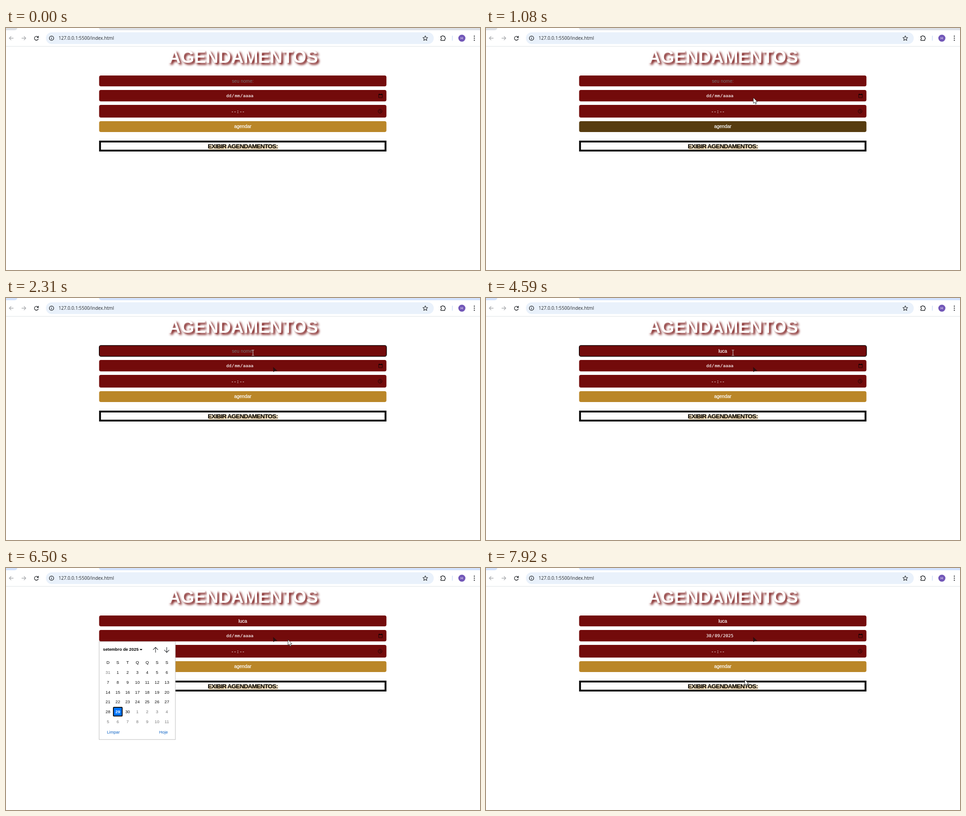
Recreate the animation shown at these times as an HTML page. Size 1046 px wide and 535 px high, loop 8 s.

```html
<!DOCTYPE html>
<html lang="pt-BR">
<head>
<meta charset="utf-8">
<title>Agendamentos</title>
<style>
  html, body { margin: 0; width: 100%; height: 100%; overflow: hidden; background: #fff; }
  svg { display: block; width: 1046px; height: 535px; font-family: "Liberation Sans", Arial, sans-serif; }
  .mid { text-anchor: middle; }
  .field { fill: #730b0b; }
  .input { font-size: 10.3px; fill: #fff; stroke: #fff; stroke-width: .25px; text-anchor: middle; }
  .hint { font-size: 10.3px; fill: #757575; text-anchor: middle; }
  .mono { font: 9.5px "DejaVu Sans Mono", monospace; fill: #fff; stroke: #fff; stroke-width: .15px; }
  .line { fill: none; stroke: #25282c; stroke-width: 1.3px; }
  .faded { stroke: #a9abae; }
  .title { font-size: 38.5px; font-weight: bold; fill: #fff; text-shadow: 4px 4px 5px #730b0b; }
  .list { font-size: 13.5px; font-weight: bold; letter-spacing: -.72px; text-shadow: 2px 2px 4px #bb8628; }
  .url { font: 10.1px "Open Sans", "Noto Sans", sans-serif; fill: #24282d; }
  .calendar { font-size: 9.3px; }
  .link { fill: #0b62c4; }
</style>
</head>
<body>
<svg viewBox="0 0 1046 535">
  <g id="browser">
    <path id="tabs" d="M0 0H25Q24 5 18 5H0ZM205 0Q206 5 212 5H1046V0Z"/>
    <path d="M0 40.5H1046" stroke="#dfe2e6"/>
    <rect x="88" y="9.5" width="856" height="26" rx="13" fill="#e9f1fb"/>
    <path class="line faded" d="M16.5 22.5H7.5M11.5 18.3L7.3 22.5L11.5 26.7M34.5 22.5H43.5M39.5 18.3L43.7 22.5L39.5 26.7"/>
    <path class="line" d="M70.6 20.2A4.3 4.3 0 1 0 71.3 23.6M71.5 17.6V21H68"/>
    <circle class="line" cx="100.5" cy="22.5" r="4.8" stroke-width="1.1"/>
    <path class="line" d="M100.5 21.9V25.2M100.5 19.5V20.8"/>
    <text class="url" x="116" y="26">127.0.0.1:5500/index.html</text>
    <path class="line" stroke-linejoin="round" style="stroke-width:1.1px"
      d="M925.3 17.2L926.9 20.8L930.7 21.2L927.8 23.7L928.7 27.5L925.3 25.5L921.9 27.5L922.8 23.7L919.9 21.2L923.7 20.8Z"/>
    <path class="line" stroke-linejoin="round"
      d="M959.5 18.5H962.3A1.6 1.6 0 0 1 965.5 18.5H968.3V21.3A1.6 1.6 0 0 1 968.3 24.5V27.5H959.5V24.7A1.7 1.7 0 0 0 959.5 21.3Z"/>
    <path d="M985 17V28" stroke="#c3d8f5" stroke-width="1.3"/>
    <circle cx="1006" cy="22.5" r="7.8" fill="#7257b8"/>
    <text class="mid" x="1006" y="25.4" font-size="8" fill="#fff">H</text>
    <path d="M1033.5 18V18M1033.5 22.5V22.5M1033.5 27V27" stroke="#25282c" stroke-width="2.4" stroke-linecap="round"/>
  </g>

  <text class="title mid" x="523" y="76.5">AGENDAMENTOS</text>
  <rect class="field" x="205.5" y="105" width="634" height="24" rx="4"/>
  <rect id="focus" x="205.8" y="105" width="633.8" height="24" rx="4" fill="none" stroke="#100303" stroke-width="1.6"/>
  <text id="hint" class="hint" x="522.5" y="120.7">seu nome:</text>
  <text id="name" class="input" x="522.5" y="120.7"></text>
  <rect id="caret" y="111" width="1" height="12" fill="#fff"/>

  <rect class="field" x="205.5" y="137" width="634" height="25.3" rx="4"/>
  <text id="day" class="mono" x="486" y="153.2"></text>
  <text class="mono" x="498" y="153.2">/</text>
  <text id="month" class="mono" x="504.7" y="153.2"></text>
  <text class="mono" x="516.7" y="153.2">/</text>
  <text id="year" class="mono" x="523" y="153.2"></text>
  <path d="M822.5 147.5H830.5V154H822.5Z" fill="none" stroke="#160303"/>
  <path d="M822 146.8H831M824 145.3V147M829 145.3V147" stroke="#160303" stroke-width="1.5"/>

  <rect class="field" x="205.5" y="170" width="634" height="28" rx="4"/>
  <text class="mono mid" x="502.5" y="187.5">--</text>
  <text class="mono mid" x="511.7" y="187.5">:</text>
  <text class="mono mid" x="521" y="187.5">--</text>
  <circle cx="825.5" cy="184" r="4.2" fill="none" stroke="#160303"/>
  <path d="M825.5 181.3V184.3L827.5 185.5" fill="none" stroke="#160303"/>

  <path id="smudge" d="M589.5 152.5L599 161L592.5 161.5L590 164Z" fill="#2d0c0e"/>
  <rect id="button" x="205.5" y="206" width="634" height="24" rx="4"/>
  <text class="input" x="522.5" y="221">agendar</text>
  <rect x="207.5" y="251" width="630" height="20" fill="#fff" stroke="#000" stroke-width="4"/>
  <text class="list mid" x="522.5" y="266.2">EXIBIR AGENDAMENTOS:</text>

  <g id="calendar" class="calendar">
    <rect x="205.5" y="162.8" width="168.3" height="216.4" fill="#fff" stroke="#bcbcbc"/>
    <text x="214" y="183.3" font-weight="bold">setembro de 2025</text>
    <path d="M295 179H301L298 182.3Z"/>
    <path class="line" style="stroke-width:1.1px" d="M330 187V175.5M324.6 180.8L330 175.3L335.4 180.8M354.7 175V186.5M349.3 181.2L354.7 186.7L360.1 181.2"/>
    <g id="cells"></g>
    <text class="link" x="222.7" y="366.4">Limpar</text>
    <text class="link" x="338" y="366.4">Hoje</text>
  </g>

  <path id="arrow" d="M0 0V12.6L2.9 9.9L4.8 14.3L6.8 13.5L5 9.2H8.8Z" fill="#fff" stroke="#222" stroke-width=".9" stroke-linejoin="round"/>
  <path id="beam" d="M-2.5 -6H-.7L0 -5.3L.7 -6H2.5M0 -5.3V5.3M-2.5 6H-.7L0 5.3L.7 6H2.5" fill="none" stroke="#d9e2e2"/>
</svg>
<script>
const LOOP = 8000, NAME = 'luca';
const $ = id => document.getElementById(id);
const show = (id, on) => $(id).setAttribute('visibility', on ? 'visible' : 'hidden');
const setText = (id, value) => { if ($(id).textContent !== value) $(id).textContent = value; };
const lerp = (a, b, u) => a + (b - a) * u;

function add(parent, tag, attrs, text) {
  const el = document.createElementNS('http://www.w3.org/2000/svg', tag);
  for (const key in attrs) el.setAttribute(key, attrs[key]);
  if (text !== undefined) el.textContent = text;
  parent.append(el);
  return el;
}

// Calendar grid
const PITCH = 21.65, GRID = { x: 214.2, y: 220.2 }, TODAY = 29;
const cells = [];
[...'DSTQQSS'].forEach((letter, i) =>
  add($('cells'), 'text', { class: 'mid', x: 225 + i * PITCH, y: 211.8 }, letter));
for (let i = 0; i < 42; i++) {
  const x = GRID.x + i % 7 * PITCH, y = GRID.y + Math.floor(i / 7) * PITCH;
  const today = i === TODAY, outside = i < 1 || i > 30;
  const edge = today ? 2 : 1;
  cells.push(add($('cells'), 'rect', {
    x: x + edge / 2 + .2, y: y + edge / 2 + .2, width: 21.3 - edge, height: 21.3 - edge, rx: 1,
    'stroke-width': edge
  }));
  add($('cells'), 'text', {
    class: 'mid', x: x + 10.8, y: y + 14.2,
    fill: today ? '#fff' : outside ? '#777' : '#111',
    'font-weight': today ? 'bold' : 'normal'
  }, i < 1 ? 31 : i > 30 ? i - 30 : i);
}

// Pointer legs: first step, last step, step count, destination
const START = [966, 574];
const LEGS = [
  [260, 330, 2, 794, 376],
  [590, 1080, 8, 590, 154],
  [1360, 1650, 5, 545, 121],
  [4920, 5200, 5, 491, 154],
  [5350, 5690, 6, 818, 153],
  [5890, 5960, 2, 826.5, 152],
  [6500, 6570, 2, 418, 165],
  [6770, 7180, 6, 267.5, 325],
  [7380, 7520, 3, 262, 315],
  [7660, 7920, 5, 571, 247]
];

function stepped(t, first, last, count) {
  if (t < first) return 0;
  const step = (last - first) / (count - 1);
  return Math.min(count, Math.floor((t - first) / step + 1e-6) + 1) / count;
}

function pointerAt(t) {
  let [x, y] = START;
  for (const [first, last, count, toX, toY] of LEGS) {
    const u = stepped(t, first, last, count);
    const eased = u * u * (3 - 2 * u);
    x = lerp(x, toX, eased);
    y = lerp(y, toY, eased);
  }
  return [x, y];
}

function drawPointer(t) {
  const [x, y] = pointerAt(t);
  const overName = y > 105 && y < 129;
  show('arrow', t >= 260 && !overName);
  show('beam', overName);
  for (const id of ['arrow', 'beam']) $(id).setAttribute('transform', `translate(${x} ${y})`);
  return [x, y];
}

// Focus, each key press: these restart the caret blink
const KEYS = [1780, 3050, 3590, 3790, 4060], BLINK = 530;

function drawName(t) {
  const pressed = KEYS.filter(k => t >= k);
  const typed = NAME.slice(0, Math.max(0, pressed.length - 1));
  const focused = t >= 1790 && t < 6100;
  const caretOn = focused && Math.floor((t - pressed.at(-1)) / BLINK) % 2 === 0;
  setText('name', typed);
  show('hint', !typed);
  show('focus', focused);
  show('caret', caretOn);
  const width = typed ? $('name').getComputedTextLength() : 0;
  $('caret').setAttribute('x', 522 + width / 2);
}

function drawCalendar(t, [x, y]) {
  const open = t >= 6170 && t < 7660;
  show('calendar', open);
  const col = Math.floor((x - GRID.x) / PITCH), row = Math.floor((y - GRID.y) / PITCH);
  const inside = col >= 0 && col < 7 && row >= 0 && row < 6;
  const hovered = open && inside ? row * 7 + col : -1;
  cells.forEach((cell, i) => {
    const active = i === hovered;
    cell.setAttribute('fill', i === TODAY ? '#0075ff' : active ? '#a9cbfa' : 'none');
    cell.setAttribute('stroke', i === TODAY || active ? '#101010' : 'none');
  });
}

function drawButton(t) {
  const u = stepped(t, 940, 1080, 3) - stepped(t, 1150, 1220, 2);
  const gold = [186, 134, 40], dark = [87, 60, 16];
  $('button').setAttribute('fill', `rgb(${gold.map((c, i) => Math.round(lerp(c, dark[i], u)))})`);
}

function draw(t) {
  const picked = t >= 7660;
  setText('day', picked ? '30' : 'dd');
  setText('month', picked ? '09' : 'mm');
  setText('year', picked ? '2025' : 'aaaa');
  $('tabs').setAttribute('fill', t < 1790 ? '#dee1e6' : '#d3e3fd');
  show('smudge', t >= 1360);
  drawName(t);
  drawButton(t);
  drawCalendar(t, drawPointer(t));
}

const began = performance.now();
function tick() {
  draw((performance.now() - began) % LOOP);
  requestAnimationFrame(tick);
}
tick();
</script>
</body>
</html>
```
